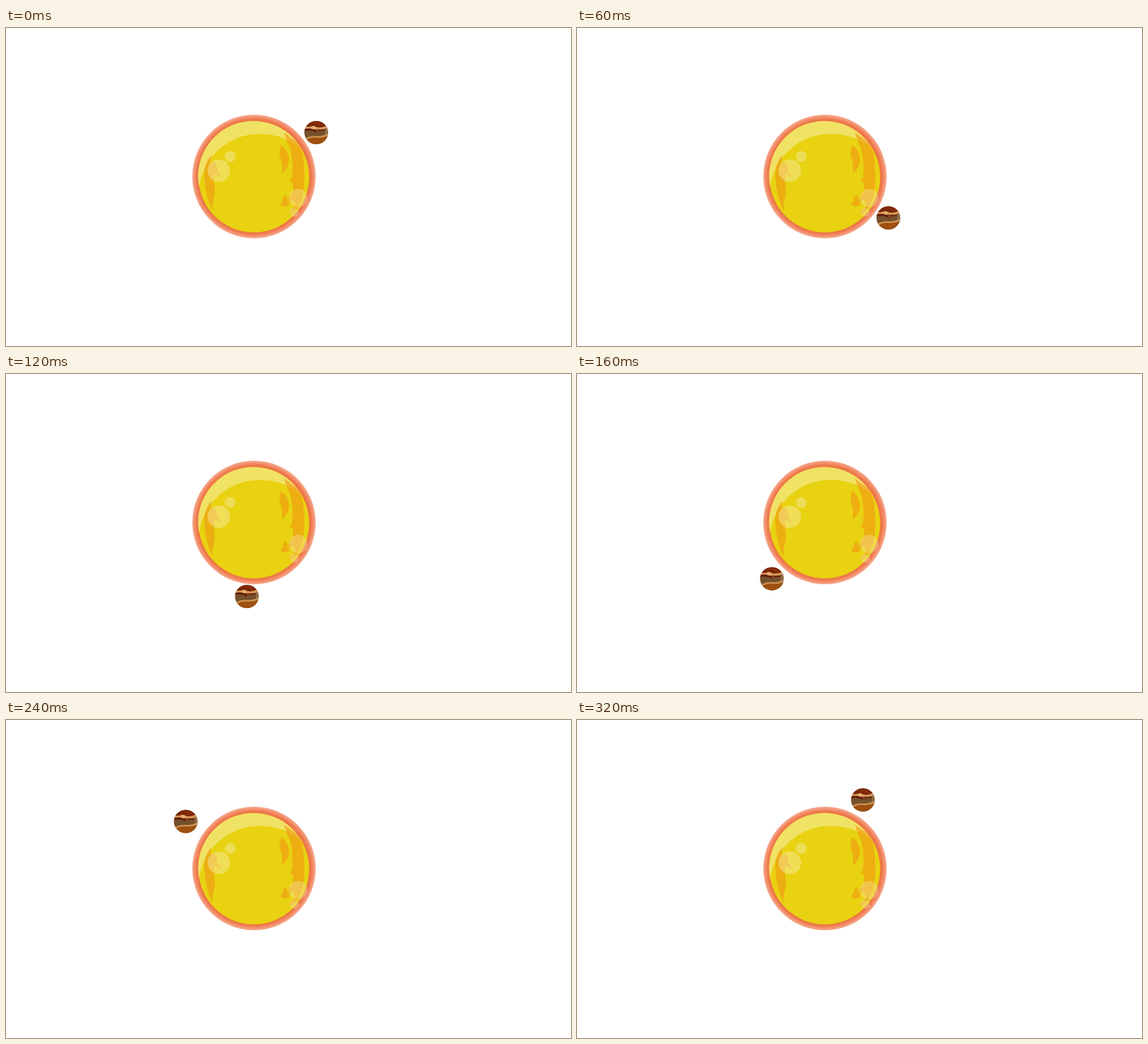
An HTML page with a canvas for the animation above (0.34 s loop, 998 px wide and 561 px high).

```html
<!DOCTYPE html>
<html lang="en">
<head>
<meta charset="utf-8">
<title>Planet in orbit</title>
<style>
  html, body { margin: 0; width: 100%; height: 100%; overflow: hidden; background: #fff; }
  canvas { display: block; }
</style>
</head>
<body>
<canvas id="stage" width="998" height="561"></canvas>
<script>
const ctx = document.getElementById('stage').getContext('2d');
const STEP = 20, STEPS = 17;
const CENTER = { x: 433.5, y: 256.5 };
const SUN = { x: 438, y: 262 };

// Points on the slightly uneven orbit: step, x, y
const orbit = [
  [0, 548, 184.5], [3, 550, 335], [6, 425.5, 392.5], [10, 298, 286.5], [11, 298.5, 232],
  [12, 317.5, 179], [14, 407.5, 125.5], [15, 456.5, 120.5], [16, 505, 141]
].map(([step, x, y]) => {
  const dx = x - CENTER.x, dy = y - CENTER.y;
  let angle = Math.atan2(dy, dx);
  if (step > 6 && angle < 0 || step > 11) angle += 2 * Math.PI;
  if (angle > 2 * Math.PI) angle -= 2 * Math.PI;
  return { step, angle, radius: Math.hypot(dx, dy) };
});
orbit.push({ step: STEPS, angle: orbit[0].angle + 2 * Math.PI, radius: orbit[0].radius });

function planetAt(step) {
  const i = orbit.findIndex(p => p.step > step);
  const a = orbit[i - 1], b = orbit[i];
  const k = (step - a.step) / (b.step - a.step);
  const angle = a.angle + (b.angle - a.angle) * k;
  const radius = a.radius + (b.radius - a.radius) * k;
  return { x: CENTER.x + radius * Math.cos(angle), y: CENTER.y + radius * Math.sin(angle) };
}

function shape(color, path) {
  ctx.fillStyle = color;
  ctx.fill(new Path2D(path));
}

function disc(color, x, y, rx, ry = rx) {
  ctx.fillStyle = color;
  ctx.beginPath();
  ctx.ellipse(x, y, rx, ry, 0, 0, 2 * Math.PI);
  ctx.fill();
}

function drawSun() {
  const rim = ctx.createRadialGradient(SUN.x, SUN.y, 97, SUN.x, SUN.y, 109);
  rim.addColorStop(0, '#ec6f3c');
  rim.addColorStop(0.4, '#ef7c50');
  rim.addColorStop(1, '#f6ab93');
  disc(rim, SUN.x, SUN.y, 109);
  disc('#e8d211', 437.8, 262.8, 97.8);

  shape('#f0e264', `M341 280 A97.8 97.8 0 0 1 523 215
    C504 196 477 187 448 187 C393 187 350 226 341 280Z`);

  const flare = 'rgba(242,150,18,.6)';
  shape(flare, `M491 184 C497 190 510 196 519 207 C525 222 527 243 527 262
    C527 286 523 305 514 319 L502 329 L501 324 L510 315 C512 309 510 304 505 303
    L498 309 L499 300 L507 288 L507 273 L500 269 L505 265
    C508 245 505 225 502 212 Q496 202 491 184Z`);
  shape(flare, 'M485 207 Q496 211 500 231 Q499 249 487 256 Q490 240 483 225Z');
  shape(flare, 'M494 295 Q498 300 497 305 L501 311 Q492 318 485 312 Q485 308 489 305 Q488 299 494 295Z');
  shape(flare, `M363 224 C354 234 350 245 350 258 C351 278 355 303 365 323
    C363 307 370 297 369 283 Q366 270 368 257 L380 263 Q379 258 373 253
    Q374 239 365 235 L361 239Z`);

  const bubble = 'rgba(245,235,170,.45)';
  disc(bubble, 376, 251.7, 20);
  disc(bubble, 396, 226.8, 9.7);
  disc('rgba(247,225,160,.4)', 516, 300, 16.3);
  disc('rgba(247,225,160,.4)', 509, 325, 8);
}

function drawPlanet({ x, y }) {
  ctx.save();
  ctx.translate(x, y);
  ctx.beginPath();
  ctx.ellipse(0, 0, 21, 20.5, 0, 0, 2 * Math.PI);
  ctx.clip();
  shape('#74502b', 'M-22 -22H22V22H-22Z');
  shape('#7a2609', 'M-22 -22H22V-11 Q12 -4 2 -8 T-22 -10Z');
  shape('#93360f', 'M-13 -17 Q0 -21 13 -13 Q8 -12 4 -15 T-13 -17Z');
  shape('#64180a', 'M-22 -7 Q-8 -8 2 -5 Q12 -6 18 -4 L6 -3 Q1 1 -4 -2 T-22 -3Z');
  shape('#d99a57', `M-22 -11 Q-14 -9 -9 -11 Q-4 -13 0 -10 Q10 -7 20 -14 L22 -10
    Q12 -4 3 -6 Q-4 -4 -9 -7 Q-15 -8 -22 -6Z`);
  disc('#e4ae72', -5, -9, 4, 2.6);
  disc('#ad6434', 2, -3, 2, 1.2);
  shape('#9d5010', 'M-22 11 Q-12 7 0 8 T22 5 V22 H-22Z');
  shape('#cd914f', 'M-20 11 Q-13 6 -3 6 Q10 7 21 2 L20 6 Q10 10 0 9 T-17 13Z');
  shape('rgba(190,155,115,.4)', 'M15 -8 Q18 -2 14 7 L22 5 V-8Z');
  ctx.restore();
}

function render(now) {
  const step = Math.floor(now / STEP) % STEPS;
  ctx.fillStyle = '#fff';
  ctx.fillRect(0, 0, 998, 561);
  drawSun();
  drawPlanet(planetAt(step));
  requestAnimationFrame(render);
}

render(0);
</script>
</body>
</html>
```
